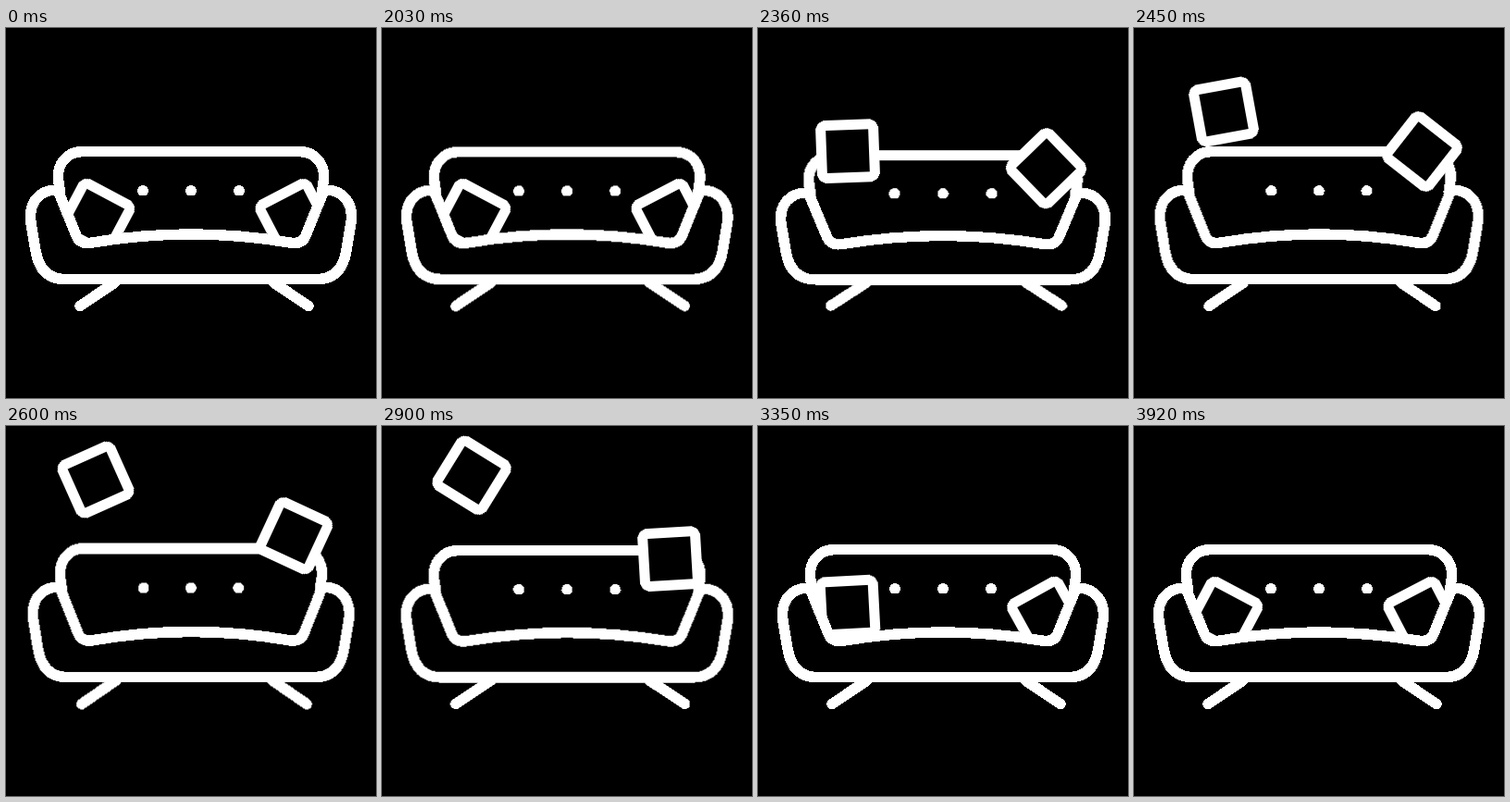
An HTML page without scripts for the animation above (3950 ms loop, 400 by 400 pixels).

```html
<!DOCTYPE html>
<html lang="en">
<head>
<meta charset="utf-8">
<title>Bouncing sofa</title>
<style>
html, body { margin: 0; width: 100%; height: 100%; overflow: hidden; background: #000; }
svg { display: block; width: 100vw; height: 100vh; shape-rendering: crispEdges; }
.line { fill: #000; stroke: #fff; stroke-width: 11.5; stroke-linecap: round; stroke-linejoin: round; }
.sofa, .hop, .spin { animation: 3950ms linear infinite; }
.sofa { transform-origin: 200px 290px; animation-name: squash; }
.left .hop { animation-name: hop-left; }
.left .spin { animation-name: spin-left; }
.right .hop { animation-name: hop-right; }
.right .spin { animation-name: spin-right; }

@keyframes squash {
  0%, 50.7% { transform: scale(1, 1); animation-timing-function: ease-in-out; }
  55.7% { transform: scale(1.032, .94); animation-timing-function: ease-in; }
  59.75% { transform: scale(1.011, .974); animation-timing-function: ease-out; }
  64.3% { transform: scale(.983, 1.012); animation-timing-function: ease-in-out; }
  70.9% { transform: scale(1.006, .988); animation-timing-function: ease-in-out; }
  76% { transform: scale(1, 1); }
  78.7% { transform: scale(1.002, .998); }
  81% { transform: scale(1.004, .995); }
  84.8%, 100% { transform: scale(1, 1); }
}
/* Heights are offsets from the resting place on the seat */
@keyframes hop-left {
  0%, 51.39% { transform: translateY(0); animation-timing-function: ease-in-out; }
  54.6% { transform: translateY(4px); }
  55.7% { transform: translateY(0); animation-timing-function: cubic-bezier(.34, .33, .3, 1); }
  70.13% { transform: translateY(-155px); animation-timing-function: cubic-bezier(.36, 0, .68, .12); }
  84.81% { transform: translateY(-9px); animation-timing-function: ease-out; }
  92.4% { transform: translateY(-1px); }
  99.24%, 100% { transform: translateY(0); }
}
@keyframes hop-right {
  0%, 51.39% { transform: translateY(0); animation-timing-function: ease-in-out; }
  54.6% { transform: translateY(4px); }
  55.5% { transform: translateY(0); animation-timing-function: cubic-bezier(.333, .667, .667, 1); }
  66.84% { transform: translateY(-87px); animation-timing-function: cubic-bezier(.333, 0, .667, .333); }
  79%, 100% { transform: translateY(0); }
}
/* A quarter turn brings each square back to its resting pose */
@keyframes spin-left {
  0%, 54.6% { transform: rotate(28deg); }
  59.75% { transform: rotate(-2deg); }
  65.82% { transform: rotate(-24deg); }
  78.73% { transform: rotate(-82deg); }
  84.81% { transform: rotate(-93deg); animation-timing-function: ease-in-out; }
  92.4% { transform: rotate(-67deg); animation-timing-function: ease-out; }
  99.24%, 100% { transform: rotate(-62deg); }
}
@keyframes spin-right {
  0%, 54.6% { transform: rotate(-27.5deg); }
  59.75% { transform: rotate(-44deg); }
  65.82% { transform: rotate(-65deg); }
  78.73% { transform: rotate(-113deg); animation-timing-function: ease-out; }
  84.81% { transform: rotate(-119deg); animation-timing-function: ease-in-out; }
  92.4% { transform: rotate(-116deg); animation-timing-function: ease-out; }
  99.24%, 100% { transform: rotate(-117.5deg); }
}
</style>
</head>
<body>
<svg viewBox="0 0 400 400">
  <defs>
    <rect id="pillow" class="line" x="-28.5" y="-28.5" width="57" height="57" rx="6.5"/>
    <path id="button" fill="#fff" d="M-3.5 5a6 6 0 1 1 7 0z"/>
  </defs>

  <g class="sofa">
    <path class="line" d="M80 300.5L118 275M327 300.5L289 275"/>
    <path class="line" d="M58.5 177L56.5 164C55 147 66 133.7 82 133.7H318C334 133.7 345 147 343.5 164L341.5 177"/>
    <use href="#button" x="148" y="176"/>
    <use href="#button" x="200" y="176"/>
    <use href="#button" x="252" y="176"/>
  </g>

  <g class="left" transform="translate(97 205)">
    <g class="hop"><g class="spin"><use href="#pillow"/></g></g>
  </g>
  <g class="right" transform="translate(311.5 205)">
    <g class="hop"><g class="spin"><use href="#pillow"/></g></g>
  </g>

  <g class="sofa">
    <path class="line" d="M56 175L76 224.5Q80 234.5 93 232Q200 214 307 232Q320 234.5 324 224.5L344 175
      C364 174.5 376 188.5 373 210.5L368 240.5Q363 271.6 336 271.6H64Q37 271.6 32 240.5L27 210.5C24 188.5 36 174.5 56 175z"/>
  </g>
</svg>
</body>
</html>
```
